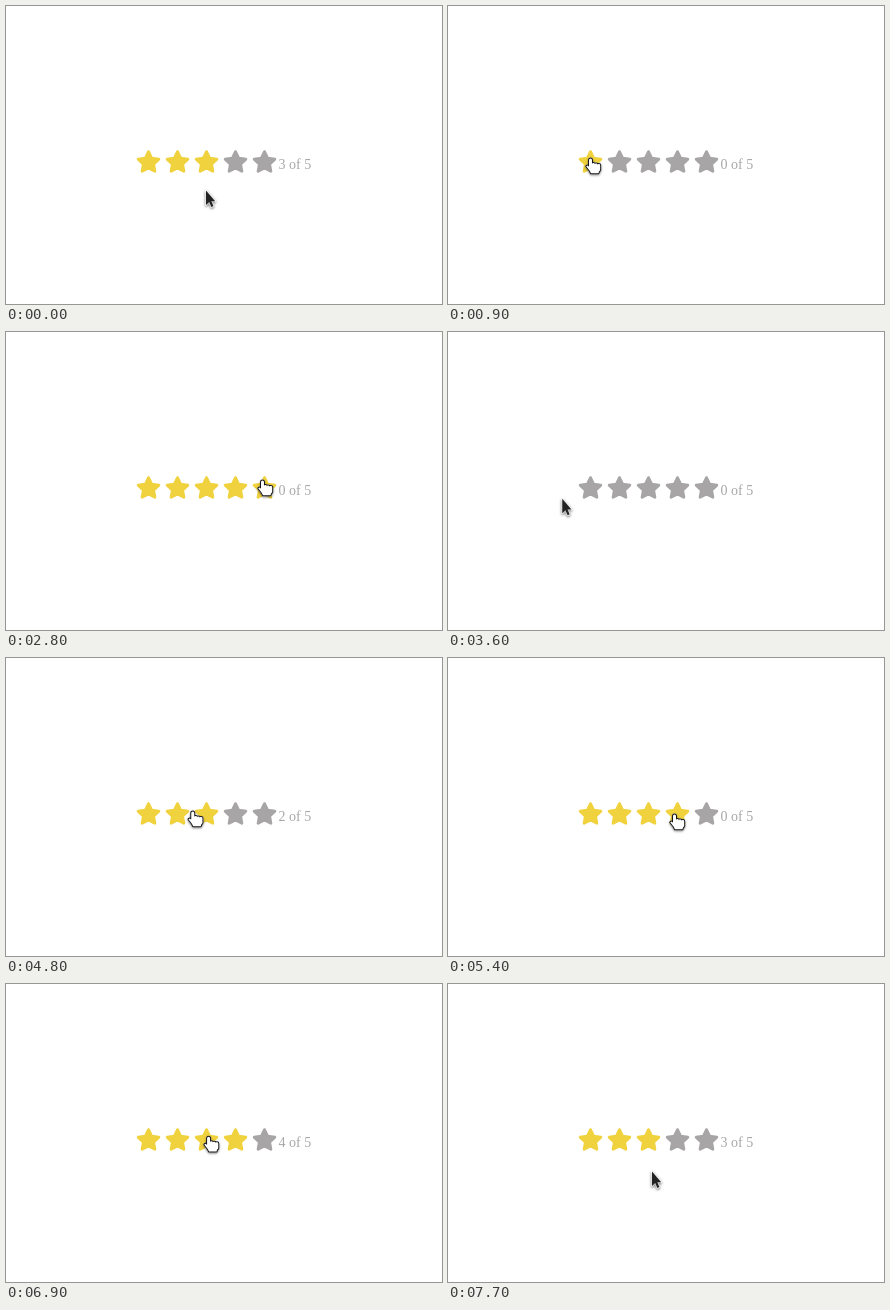
These frames come from a looping animation (436 by 298 pixels, 8700 ms). An HTML page with a canvas:

```html
<!DOCTYPE html>
<html lang="en">
<head>
<meta charset="utf-8">
<title>Star rating</title>
<style>
  html, body { margin: 0; width: 100%; height: 100%; overflow: hidden; background: #fff; }
  canvas { position: absolute; left: 0; top: 0; }
  #label {
    position: absolute; left: 272.5px; top: 151px;
    font: 14px/16px "Liberation Serif", serif; color: #a9a7a7; white-space: pre;
  }
</style>
</head>
<body>
<canvas id="stage" width="436" height="298"></canvas>
<div id="label">3 of 5</div>
<script>
const LOOP = 8700, STEP = 100;
const GOLD = '#f0d23e', GRAY = '#a7a5a5';
const FIRST_X = 142.5, STAR_Y = 156.5, GAP = 29, COUNT = 5;

const ctx = document.getElementById('stage').getContext('2d');
const label = document.getElementById('label');

// Pointer stops: arrival time, x, y, steps on the way (2 unless given)
const STOPS = [
  [0, 200, 184], [400, 169, 163], [700, 143, 151], [1300, 145, 172, 4],
  [1600, 145, 189], [1900, 145, 178], [2400, 143, 153], [2800, 257, 147, 3],
  [3400, 112, 152, 5], [3700, 115, 171], [4100, 152, 149, 4],
  [4400, 167, 152], [4900, 194, 152], [5400, 227, 155],
  [6000, 247, 208, 3], [6200, 245, 193], [6600, 235, 163, 4],
  [7100, 197, 149, 5], [7700, 204, 187, 3]
];
const CLICKS = [700, 900, 4500, 5000, 5200, 5600, 7300];
const START_RATING = 3;

const ARROW = new Path2D('M0 .6V14.9L3.2 12L5.4 17L7.4 16.1L5.3 11.2H9.2Z');

const STAR = new Path2D();
for (let i = 0; i < 10; i++) {
  const r = i % 2 ? 5.4 : 10.9, a = i * Math.PI / 5;
  STAR.lineTo(r * Math.sin(a), -r * Math.cos(a));
}
STAR.closePath();

// Thumb and palm, forefinger, then three folded fingers
const HAND = new Path2D('M-4.8 9.2L-3.4 8.4L-1 10.5H9L7.5 16.2H0L-1.5 13.5Z');
HAND.roundRect(-2, 1.4, 3, 11, 1.5);
for (let i = 0; i < 3; i++) HAND.roundRect(1 + i * 2.7, 6 + i * 0.5, 2.8, 7, 1.2);

const easeOut = p => 1 - (1 - p) ** 2;

function pointerAt(t) {
  let [, x, y] = STOPS[0];
  for (const [end, toX, toY, steps = 2] of STOPS) {
    const p = Math.max(0, Math.min(1, 1 - (end - t) / (steps * STEP)));
    x += (toX - x) * easeOut(p);
    y += (toY - y) * easeOut(p);
    if (p < 1) break;
  }
  return [x, y];
}

function hoveredStar(x, y) {
  const n = Math.floor((x - FIRST_X + 15) / GAP) + 1;
  return y >= 142 && y < 174 && n >= 1 && n <= COUNT ? n : 0;
}

// Clicking the current rating again clears it
function ratingAt(t) {
  return CLICKS.filter(c => c <= t).reduce((rating, c) => {
    const n = hoveredStar(...pointerAt(c));
    return n === rating ? 0 : n;
  }, START_RATING);
}

function shape(path, x, y, fill, stroke, width) {
  ctx.save();
  ctx.translate(x, y);
  ctx.lineJoin = 'round';
  ctx.lineWidth = width;
  ctx.fillStyle = fill;
  ctx.strokeStyle = stroke;
  ctx.stroke(path);
  ctx.fill(path);
  ctx.restore();
}

function drawPointer(x, y, isHand) {
  const path = isHand ? HAND : ARROW;
  ctx.save();
  ctx.shadowColor = 'rgba(0,0,0,.4)';
  ctx.shadowBlur = 2.5;
  ctx.shadowOffsetY = 1;
  shape(path, x, y, '#fff', '#fff', 2);
  ctx.restore();
  if (isHand) shape(path, x, y, '#fff', '#151515', 2);
  else shape(path, x, y, '#222', 'transparent', 1);
}

function draw(time) {
  const t = Math.floor(time % LOOP / STEP) * STEP;
  const [x, y] = pointerAt(t);
  const rating = ratingAt(t), hover = hoveredStar(x, y);
  const lit = Math.max(rating, hover);

  ctx.fillStyle = '#fff';
  ctx.fillRect(0, 0, 436, 298);
  for (let i = 0; i < COUNT; i++) {
    const color = i < lit ? GOLD : GRAY;
    shape(STAR, FIRST_X + i * GAP, STAR_Y, color, color, 2.8);
  }
  drawPointer(x, y, hover > 0);
  const text = `${rating} of ${COUNT}`;
  if (label.textContent !== text) label.textContent = text;
}

const began = performance.now();
function tick() {
  draw(performance.now() - began);
  requestAnimationFrame(tick);
}
tick();
</script>
</body>
</html>
```
